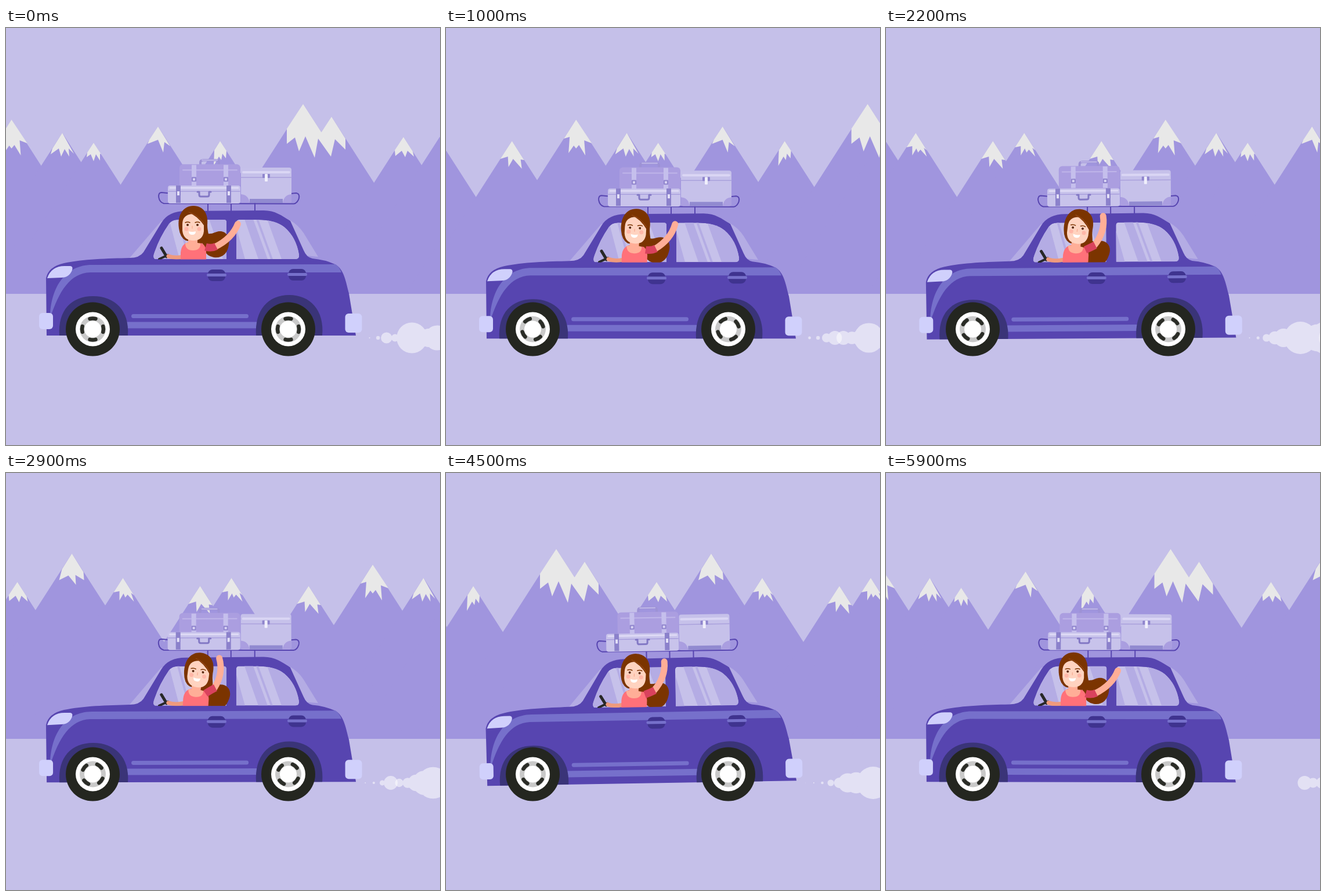
An HTML page with a canvas that plays this animation: 748x720 px, repeating every 6000 ms.

```html
<!DOCTYPE html>
<html lang="en">
<head>
<meta charset="utf-8">
<title>Road trip</title>
<style>
html, body { margin: 0; width: 100%; height: 100%; overflow: hidden; background: #c5c0e9; }
canvas { display: block; }
</style>
</head>
<body>
<canvas id="stage" width="748" height="720"></canvas>
<script>
const ctx = document.getElementById('stage').getContext('2d');
const TAU = Math.PI * 2, DEG = Math.PI / 180;
const LOOP = 6000, STEP = 100, RANGE = 1288;
const SKY = '#c5c0e9', HILL = '#a095de', SNOW = '#e8e8e8';
const BODY = '#5745b0', STRIPE = '#7670cb', ARCH = '#3a3478', HANDLE = '#3f338f';
const LAMP = '#d0d0fc', GLASS = '#b4ace4', SHINE = '#c6c1ea';
const HAIR = '#7b3400', FACE = '#ffd3c0', SKIN = '#ffae97';

const smooth = (from, to, x) => {
  const p = Math.min(1, Math.max(0, (x - from) / (to - from)));
  return p * p * (3 - 2 * p);
};
const mix = (a, b, p) => a + (b - a) * p;

function fill(color, d) {
  ctx.fillStyle = color;
  ctx.fill(new Path2D(d));
}
function stroke(color, width, d, cap = 'round') {
  ctx.strokeStyle = color;
  ctx.lineWidth = width;
  ctx.lineCap = cap;
  ctx.lineJoin = 'round';
  ctx.stroke(new Path2D(d));
}
function box(color, x, y, w, h, r = 0) {
  ctx.fillStyle = color;
  ctx.beginPath();
  ctx.roundRect(x, y, w, h, r);
  ctx.fill();
}
function disc(color, x, y, r) {
  ctx.fillStyle = color;
  ctx.beginPath();
  ctx.arc(x, y, r, 0, TAU);
  ctx.fill();
}
function moved(x, y, draw) {
  ctx.save();
  ctx.translate(x, y);
  draw();
  ctx.restore();
}
function turned(x, y, angle, draw) {
  ctx.save();
  ctx.translate(x, y);
  ctx.rotate(angle);
  ctx.translate(-x, -y);
  draw();
  ctx.restore();
}

// Snow caps, relative to their summit
const CAP = {
  tall: 'M0 0L27 41 14 36 16 62 5 44 0 50 -4 45 -13 58 -11 30 -21 33Z',
  wide: 'M0 0L20 36 11 27 12 41 4 28 -2 41 -6 27 -20 37 -17 27Z',
  bent: 'M0 0L19 30 14 26 19 41 8 29 4 34 1 27 -6 39 -6 23 -16 25Z',
  tiny: 'M0 0L13 20 11 19 11 31 4 20 0 32 -5 20 -12 25 -11 17Z',
  slim: 'M0 0L21 34 11 27 9 45 0 23 -18 30 -15 23Z',
  deep: 'M0 0L11 17 10 30 4 22 2 33 -2 27 -11 43 -10 16Z',
  flat: 'M0 0L16 25 18 34 7 24 3 35 -3 24 -14 33 -15 23Z',
  high: 'M0 0L20 32 21 46 6 37 7 54 -6 38 -22 46 -17 27Z',
  mid: 'M0 0L21 33 15 32 17 48 2 31 -6 45 -7 27 -20 31Z',
  twin: 'M0 0L31.5 49 49 22 73 60 73 79 55 61 48 91 26 60 20 93 4 56 -7 82 -14 58 -28 69 -28 43Z',
  none: ''
};
const PEAKS = [
  [9.5, 158, 'tall'], [97, 181, 'wide'], [151, 198, 'tiny'], [262, 170, 'slim'],
  [369, 195, 'deep'], [512, 131, 'twin'], [561, 153, 'none'], [685, 188, 'flat'],
  [779, 139, 'high'], [867, 181, 'bent'], [1000, 195, 'mid'], [1054, 181, 'bent'],
  [1187, 195, 'mid']
];

function mountains(t) {
  const shown = [];
  for (const [x, y, cap] of PEAKS) {
    const at = (x + t / 6 * RANGE) % RANGE;
    for (const px of [at - RANGE, at]) if (px > -240 && px < 990) shown.push([px, y, cap]);
  }
  for (const [x, y] of shown) {
    const half = (459 - y) / 1.56;
    fill(HILL, `M${x} ${y}L${x + half} 459H${x - half}Z`);
  }
  for (const [x, y, cap] of shown) moved(x, y, () => fill(SNOW, CAP[cap]));
}

// Growth rate of each puff; one leaves the exhaust every 0.2 s
const PUFFS = [12, 10, 12, 22, 8, 8, 16, 10, 9, 12, 15, 13, 10, 20, 12, 16,
  14, 11, 8, 8, 17, 10, 10, 18, 11, 14, 15, 10, 8, 5, 5, 8];

function smoke(t) {
  const clouds = [new Path2D(), new Path2D(), new Path2D()];
  PUFFS.forEach((rate, i) => {
    const age = t + 1.8 - i * 0.2;
    if (age <= 0) return;
    const x = 612 + 73 * age, r = rate * age * Math.min(1, 0.4 + age);
    if (x - r > 748) return;
    const cloud = clouds[Math.min(2, Math.floor(i / 10))];
    cloud.moveTo(x + r, 535);
    cloud.arc(x, 535, Math.min(r, 28), 0, TAU);
  });
  ctx.fillStyle = 'rgba(255,255,255,.52)';
  clouds.forEach(c => ctx.fill(c));
}

function upperCase() {
  stroke('#9d92d5', 4, 'M335 237V233Q335 229 340 229H362Q367 229 367 233V237', 'butt');
  stroke('#c0b8e9', 2, 'M338 229H364');
  box('#ab9ee0', 299, 236, 105, 40, 6);
  stroke('#bfb5e9', 2, 'M305 246H398');
  for (const x of [320, 375]) {
    box('#c5bfec', x, 237, 8, 37);
    box('#8f84cd', x, 258, 8, 8, 1);
    box('#d8d3f3', x + 2, 260, 4, 4);
  }
}

function luggage(t) {
  stroke(BODY, 2, 'M278 285L268 284C260 284 262 300 272 303L496 303.5C504 303 510 286 500 285L490 286');
  stroke(BODY, 2, 'M348 303V318M388 303V318M429 303V318');
  moved(0, -0.6 - 3.8 * Math.sin(t * 2 * TAU), upperCase);

  box('#c8c3eb', 279, 272, 125, 31, 4);
  stroke('#dedaf5', 3, 'M283 276H400');
  stroke('#a99fdd', 1.5, 'M280 282H403');
  for (const x of [293, 380]) {
    box('#8b81cb', x, 272, 8, 30);
    box('#e4e1f7', x + 2, 282, 4, 7);
  }
  stroke('#8379c5', 3, 'M330 283H333V288Q333 291 336 291H347Q350 291 350 288V283H353');

  box('#c6c1ea', 405, 241, 87, 61, 4);
  stroke('#dad6f4', 4, 'M409 249H488');
  stroke('#aaa1dc', 1.5, 'M405 258H492');
  fill('#aa9ee0', 'M405 287Q418 288 420 302H408Q405 302 405 298ZM492 287Q479 288 477 302H489Q492 302 492 298Z');
  box('#918ad0', 420, 295, 57, 7);
  box('#8f85cd', 442, 252, 13, 7, 1);
  box('#f0effb', 446, 252, 5, 13, 1);
}

const FRONT_WINDOW = 'M257 399Q252 397 256 387Q265 361 281 338Q286 331 296 331H376Q380 331 380 335V399Z';
const REAR_WINDOW = 'M397 399V336Q397 331 402 331H432Q464 331 480 344Q500 361 505 391Q506 399 499 399Z';

function glass(shape, bands) {
  ctx.save();
  ctx.clip(new Path2D(shape));
  fill(SHINE, shape);
  fill(GLASS, bands);
  ctx.restore();
}

function car() {
  fill(GLASS, 'M213 397L267 334 272 332 236 390Q230 397 213 397ZM488 331Q504 340 513 354L538 395 517 393Z');
  fill(BODY, 'M70 531L69 432Q73 412 100 406C132 399 175 398 213 397Q230 397 237 387L268 336Q280 316 310 316L444 315C464 315 475 324 490 333L513 384Q518 396 528 398Q550 400 567 408C583 416 586 440 591 458L603 531Z');
  glass(FRONT_WINDOW, 'M250 330H281L299 399H250ZM295 330H299L318 399H314ZM350 330H390V399H374Z');
  glass(REAR_WINDOW, 'M397 345L412 399H397ZM411 330H426L451 399H435ZM431 330H435L460 399H456ZM450 330L475 399H510V330Z');

  fill(STRIPE, 'M76 502C76 450 101 409 148 409L568 408Q575 413 578 422H145C111 423 91 454 76 502Z');
  fill(LAMP, 'M71 432Q78 411 101 411H111Q116 412 114 418Q109 431 95 431Z');
  box(STRIPE, 216, 494, 202, 7, 3.5);
  box(STRIPE, 206, 507.5, 229, 11);
  fill(ARCH, 'M92 531C89 487 113 463 150 463S213 487 210 531Z');
  fill(ARCH, 'M431 531C428 487 452 461 488 461S549 487 545 531Z');
  for (const [x, y] of [[363, 427], [502, 426]]) {
    box(HANDLE, x - 15, y - 10, 30, 20, 8);
    box(STRIPE, x - 17, y - 3, 34, 5, 2.5);
  }
  box(LAMP, 57, 492, 24, 28, 6);
  box(LAMP, 584.5, 493, 29, 33, 6);
}

function head() {
  fill(HAIR, 'M298 346C295 322 306 307 323 307C341 307 349 322 347 340C347 352 351 358 349 366Q344 374 330 371L310 367Q300 362 298 346Z');
  box(SKIN, 314, 357, 16, 25, 7);
  fill(FACE, 'M304 339Q304 322 322 321Q340 323 341 340V351Q339 367 323 367Q306 367 304 350Z');
  fill(HAIR, 'M302 343Q303 325 315 319Q330 324 342 342V322Q331 310 318 312Q302 318 302 343Z');
  stroke('#9b4a18', 1, 'M315 318Q330 322 341 337');
  for (const x of [313, 330]) {
    disc('#5a2a12', x, 340, 2);
    stroke(HAIR, 1.5, `M${x - 4} 336Q${x} 334 ${x + 4} 336`);
  }
  disc('#ffb7a8', 311, 347, 3.5);
  disc('#ffb7a8', 333, 347, 3.5);
  stroke('#f6ad94', 1.3, 'M321 342V346');
  fill('#fff', 'M315 351Q321 353 327 351Q327 357 321 357Q315 357 315 351Z');
}

function ponytail() {
  fill(HAIR, 'M336 352Q350 358 360 353C376 346 387 358 384 374C382 390 372 398 358 396Q346 394 340 382Z');
}

function torso() {
  fill('#ff7179', 'M301 402V388Q302 373 314 370H334Q346 374 345 390V402Z');
  fill(SKIN, 'M309 371Q309 384 322 384Q336 384 335 371Z');
}

function arm(lift) {
  const ex = mix(366, 365, lift), ey = mix(377, 368, lift);
  const angle = mix(-49, -87, lift) * DEG, dx = Math.cos(angle), dy = Math.sin(angle);
  const hx = ex + 51 * dx, hy = ey + 51 * dy;
  const cx = (ex + hx) / 2 - 9 * dy, cy = (ey + hy) / 2 + 9 * dx;
  stroke(SKIN, 11, `M${ex - 6} ${ey + 1}Q${cx} ${cy} ${hx} ${hy}`);
  stroke('#d9425d', 13, `M344 378Q${ex - 12} ${ey + 4} ${ex - 4} ${ey}`, 'butt');
}

function driver(t) {
  const lean = smooth(0, 2.2, t) * (1 - smooth(3.6, 5.6, t));
  const lift = smooth(0.3, 3, t) * (1 - smooth(3.6, 6, t));
  ctx.save();
  ctx.beginPath();
  ctx.rect(240, 280, 200, 119.5);
  ctx.clip();

  stroke('#282828', 5, 'M268 380L277 395');
  stroke('#282828', 4, 'M264 399L279 392');
  stroke('#ef9a7d', 7, 'M280 394Q291 398 305 395');

  moved(lean * 4, lean * 6, () => turned(345, 362, lean * 14 * DEG, ponytail));
  moved(lean * 2.5, 0, () => turned(322, 420, lean * 3.5 * DEG, () => {
    torso();
    turned(322, 374, lean * 4 * DEG, head);
  }));
  arm(lift);
  ctx.restore();
}

function wheel(x, t) {
  const y = 520;
  disc('#242620', x, y, 46.5);
  disc('#fff', x, y, 29.5);
  disc('#c9c9c9', x, y, 22.5);
  turned(x, y, -t * 390 * DEG, () => {
    ctx.strokeStyle = '#2b2d27';
    ctx.lineWidth = 6.5;
    ctx.lineCap = 'round';
    for (let i = 0; i < 4; i++) {
      ctx.beginPath();
      ctx.arc(x, y, 18.5, i * TAU / 4 - 0.27, i * TAU / 4 + 0.27);
      ctx.stroke();
    }
  });
  disc('#fff', x, y, 14.5);
}

// Rocks 0, 1, 0, -1 with an ease between the poses
function rock(t) {
  const pose = [0, 1, 0, -1, 0], phase = (t * 2) % 4, i = Math.floor(phase);
  return mix(pose[i], pose[i + 1], smooth(0, 1, phase - i));
}

function draw(t) {
  ctx.fillStyle = SKY;
  ctx.fillRect(0, 0, 748, 720);
  mountains(t);
  smoke(t);
  moved(0, 2.4 + 3 * Math.cos((t - 0.36) / 0.6 * TAU), () => {
    turned(333, 460, -rock(t) * 0.95 * DEG, () => {
      luggage(t);
      car();
      driver(t);
    });
  });
  wheel(149.5, t);
  wheel(486.5, t);
}

const start = performance.now();
function tick() {
  const ms = (performance.now() - start) % LOOP;
  draw(Math.floor(ms / STEP) * STEP / 1000);
  requestAnimationFrame(tick);
}
tick();
</script>
</body>
</html>
```
